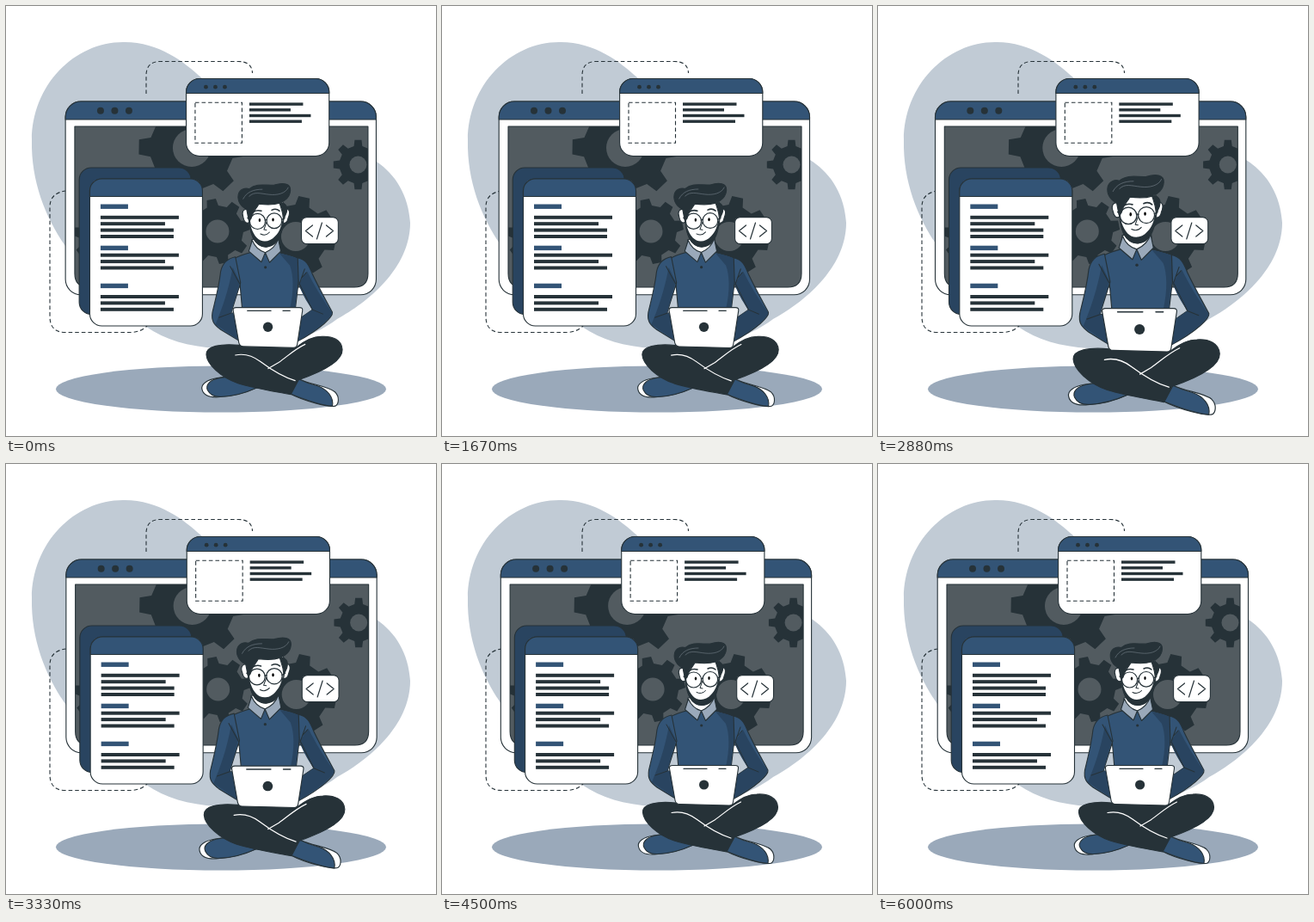
Write an HTML page that moves like this. It is 500 px wide and 500 px high and loops after 6.04 s.

```html
<!DOCTYPE html>
<html lang="en">
<head>
<meta charset="utf-8">
<title>Developer at work</title>
<style>
  html, body { margin: 0; width: 100%; height: 100%; overflow: hidden; background: #fff; }
  svg { display: block; width: 100vw; height: 100vh; }
</style>
</head>
<body>
<svg id="stage" viewBox="0 0 500 500" xmlns="http://www.w3.org/2000/svg"></svg>
<script>
const BLUE = '#335476', NAVY = '#294460', INK = '#263238', SCREEN = '#525b60';
const PALE = '#c1cbd5', MIST = '#9aa9ba', WHITE = '#fff';
const LOOP = 6040, LEAD = 40;

const path = (d, fill = 'none', stroke = INK, width = 1.1) =>
  `<path d="${d}" fill="${fill}" stroke="${stroke}" stroke-width="${width}" stroke-linecap="round" stroke-linejoin="round"/>`;
const shape = (d, fill) => path(d, fill, 'none', 0);
const dot = (x, y, r, fill = INK) => `<circle cx="${x}" cy="${y}" r="${r}" fill="${fill}"/>`;
const bar = (x, y, w, h, fill = INK) => `<rect x="${x}" y="${y}" width="${w}" height="${h}" fill="${fill}"/>`;
const panel = (x, y, w, h, r, fill) =>
  `<rect x="${x}" y="${y}" width="${w}" height="${h}" rx="${r}" fill="${fill}" stroke="${INK}" stroke-width="1.1"/>`;
const dashed = d => `<path d="${d}" fill="none" stroke="${INK}" stroke-width="1.1" stroke-dasharray="4.6 3"/>`;

// Panel with a coloured strip along its rounded top
function titledPanel(x, y, w, h, r, head) {
  const strip = `M${x} ${y + head}V${y + r}a${r} ${r} 0 0 1 ${r} ${-r}H${x + w - r}a${r} ${r} 0 0 1 ${r} ${r}V${y + head}Z`;
  return panel(x, y, w, h, r, WHITE) + path(strip, BLUE);
}

function gear(cx, cy, body, outer, hole, phase, teeth = 8) {
  const step = 360 / teeth, points = [];
  for (let i = 0; i < teeth; i++) {
    for (const [offset, r] of [[-13, body], [-8, outer], [8, outer], [13, body]]) {
      const a = (phase + i * step + offset) * Math.PI / 180;
      points.push((cx + r * Math.cos(a)).toFixed(1) + ' ' + (cy + r * Math.sin(a)).toFixed(1));
    }
  }
  return shape('M' + points.join('L') + 'Z', INK) + dot(cx, cy, hole, SCREEN);
}

function backdrop() {
  return shape('M138 42C80 41 30 92 30 156C29 204 46 246 69 279C92 318 124 350 163 373C185 388 212 396 245 398C300 402 350 390 385 364C420 345 470 305 470 252C468 220 453 196 431 181C390 152 300 135 228 84C207 65 178 42 138 42Z', PALE)
    + `<ellipse cx="250" cy="445.5" rx="192" ry="27" fill="${MIST}"/>`
    + dashed('M163 102V81Q163 64.500 179 64.500H270Q286 64.500 286.500 78')
    + dashed('M70 215Q51 217 51 234V361Q51 379.500 69 379.500H146Q157 379 164 372');
}

function browser() {
  const view = 'M80 140H421V311Q421 327 405 327H96Q80 327 80 311Z';
  return titledPanel(69.2, 111, 361.3, 224.8, 18, 21)
    + [110, 126.5, 143].map(x => dot(x, 121.7, 4)).join('')
    + shape(view, SCREEN)
    + '<g clip-path="url(#view)">'
    + gear(216, 165, 49, 62, 22, 1)
    + gear(246, 262, 30, 38, 13.5, -11)
    + gear(337, 268, 37, 47, 17, 12)
    + gear(409.5, 184.5, 22, 29, 10, 0)
    + gear(112, 268, 27, 34, 12, 10)
    + '</g>' + path(view)
    + `<clipPath id="view"><path d="${view}"/></clipPath>`;
}

function documents() {
  let out = panel(85.2, 188, 130, 170.5, 14, NAVY) + titledPanel(97.5, 201, 131, 171, 14, 20.5);
  for (const [top, gap, widths] of [[230.5, 13.3, [91, 75, 85, 85]], [278.7, 9, [91, 75, 85]], [322.7, 13.3, [91, 75, 85]]]) {
    out += bar(110, top, 32, 5.4, BLUE);
    widths.forEach((w, i) => { out += bar(110, top + gap + i * 7.4, w, 4); });
  }
  return out;
}

function card() {
  return titledPanel(209.6, 84.5, 166.2, 90, 15.5, 17)
    + [232.5, 243.5, 254.5].map(x => dot(x, 94.2, 2.4)).join('')
    + dashed('M220 112.300H274.500V159.300H220Z')
    + [62.5, 48, 71.5, 61].map((w, i) => bar(283, 112.4 + i * 6.7, w, 3.4)).join('');
}

function bubble() {
  return panel(343.6, 245.6, 42.8, 31, 6, WHITE)
    + path('M356.500 255L348.500 261.500L356.500 268M372.500 255L380.500 261.500L372.500 268M367.500 252L361.500 271', 'none', INK, 1.2);
}

function legs() {
  return path('M246 432C234 434 227 439 228.500 445C230 452 237 454.500 247 454C262 453 276 450 292 443L268 429Z', WHITE)
    + path('M248 432C238 434 232 440 235 446C238 452 243 454 251 453.500C264 453 277 450 292 443L268 429Z', BLUE)
    + path('M340 433C355 440 374 441 382 448C388 454 386 462 383 464C377 466.500 347 459 330 450Z', WHITE)
    + path('M340 433C348 437 356 439.500 362 441C373 445 381 454 379 464.500C364 463 347 457 330 450Z', BLUE)
    + path('M272 394C250 392 233 395 233.500 405C234 416 250 431 270 438C290 444 310 447 331 451L340 434C363 426 391 414 390.500 399C390 388 379 383 366 384C356 384 347 389 338 396Z', INK)
    + path('M267 405.500C279 403 288 407 296 413C308 422 320 430 336 435M347.500 393C335 399 327 407 317 414L305 421', 'none', WHITE, 1.2);
}

function torso() {
  return path('M284 287C270 291 263 294 259 301L272 320L275 354H336L340 320L347 298C342 293 330 290 318 287Z', BLUE)
    + shape('M318 288C330 290 340 293 345 298L339 323L336 352H330C335 330 334 313 330 302Z', NAVY)
    // left arm
    + path('M267 292C257 294 252 299 250 309C248 327 244 341 240.500 356C239 366 242 370 250 376L273 390V357H262L273 322Z', BLUE)
    + shape('M264 304L272 321L262 357H272V389L244 370C252 351 259 331 264 304Z', NAVY)
    + path('M261 303L272 323M262 357L248 362', 'none', INK, 1)
    // right arm
    + path('M339 293C349 295 352 302 356 312C363 327 371 341 379 356C380 361 366 375 338 390L343 362L356 353L340 323Z', BLUE)
    + shape('M350 309C358 325 367 340 378.500 356C379 361 365 374 339 389L343 362L356 353C348 342 343 332 340 323Z', NAVY)
    + path('M347 306L341 323L356 353L368 358M343 317L349 310', 'none', INK, 1)
    + path('M286 272L317 270L318 283L301.500 287L285 283Z', WHITE)
    + path('M286.500 273L282.500 285.500L297 298L301.500 287Q291 284 286.500 273ZM316.500 271L319.500 285.500L306.500 298.500L301.500 287Q313 282 316.500 271Z', MIST)
    + dot(301.7, 304, 1.6);
}

function head() {
  return path('M282 238C276 235 274 241 276 246C277 252 280 254 283 252ZM323 238C329 234 331 240 328 247C327 253 323 254 321 252Z', WHITE)
    + path('M282 228C282 247 284 262 288 271C292 278 297 281 303 280.500C311 279 319 270 322 254L325 234L318 222H288Z', WHITE)
    // beard
    + shape('M283 250C286 263 290 270 296 273C301 275 308 274 313 268C318 263 320 257 322 247C323 261 319 271 313 277C306 283 296 282 290 275C285 268 283 260 283 250Z', INK)
    // hair
    + path('M282.500 250L280 237C273 234 269 227 270.500 220C272 214 278 212 283 213.500C292 206 303 210 312 209C322 206 331 207 330.500 215C330 223 324 228 319 229C325 230 328 234 326 241L322.500 249C322 240 320 236 318 230C312 232 302 232 294 231C292 236 288 237 285 248Z', INK)
    + path('M276 225C280 217 288 214 298 214M283 222C289 216 296 219 306 220C315 221 325 219 328 212', 'none', '#76818a', .6)
    + path('M288 240Q292 237.500 297 239M309 238Q314 235.500 318 239', 'none', INK, 1.5)
    + path('M301.500 250Q302.500 248.500 303.500 249.500M283.500 249L281 247M320.500 249L324 247', 'none', INK, 1.2)
    + `<circle cx="292.600" cy="251" r="9" fill="none" stroke="${INK}" stroke-width="1.2"/>`
    + `<circle cx="311.900" cy="250.300" r="8.8" fill="none" stroke="${INK}" stroke-width="1.2"/>`
    + '<ellipse cx="295" cy="249.5" rx="1.2" ry="2"/><ellipse cx="310.5" cy="249" rx="1.2" ry="2"/>'
    + path('M303 252L300 260.500L303 261M296 265.500Q302 268.500 306.500 263.500', 'none', INK, 1);
}

function laptop() {
  return path('M268 350.500H341Q345 350.500 344.500 354L338.500 393Q338 397 334 397L276 395.500Q272 395.500 271 391L264.500 354Q264 350.500 268 350.500Z', WHITE)
    + path('M281 354.300H308M322 354.300H330', 'none', INK, 1.3)
    + dot(304.6, 373, 5.6);
}

const stage = document.getElementById('stage');
stage.innerHTML = backdrop()
  + `<g id="windows">${browser()}${documents()}${card()}${bubble()}</g>`
  + `<g id="person">${legs()}${torso()}${head()}${laptop()}</g>`;
const windows = document.getElementById('windows');
const person = document.getElementById('person');

const SHAKE = [0, -1, 2, -4, 4, -4, 4, -4, 2, -1, 0];
const PULSE = [1, 1.1, 1.05, 1, 1, 1.1, 1, 1, 1, 1, 1];

// Linear keyframes, one per tenth of the cycle
function sample(keys, phase) {
  const i = Math.floor(phase * 10);
  return keys[i] + (keys[i + 1] - keys[i]) * (phase * 10 - i);
}

function render(time) {
  const phase = (time + LEAD) % LOOP / LOOP;
  windows.setAttribute('transform', `translate(${sample(SHAKE, phase)} 0)`);
  person.setAttribute('transform',
    `translate(310 336.5) scale(${sample(PULSE, phase)}) translate(-310 -336.5)`);
}

const start = performance.now();
function tick() {
  render(performance.now() - start);
  requestAnimationFrame(tick);
}
tick();
</script>
</body>
</html>
```
